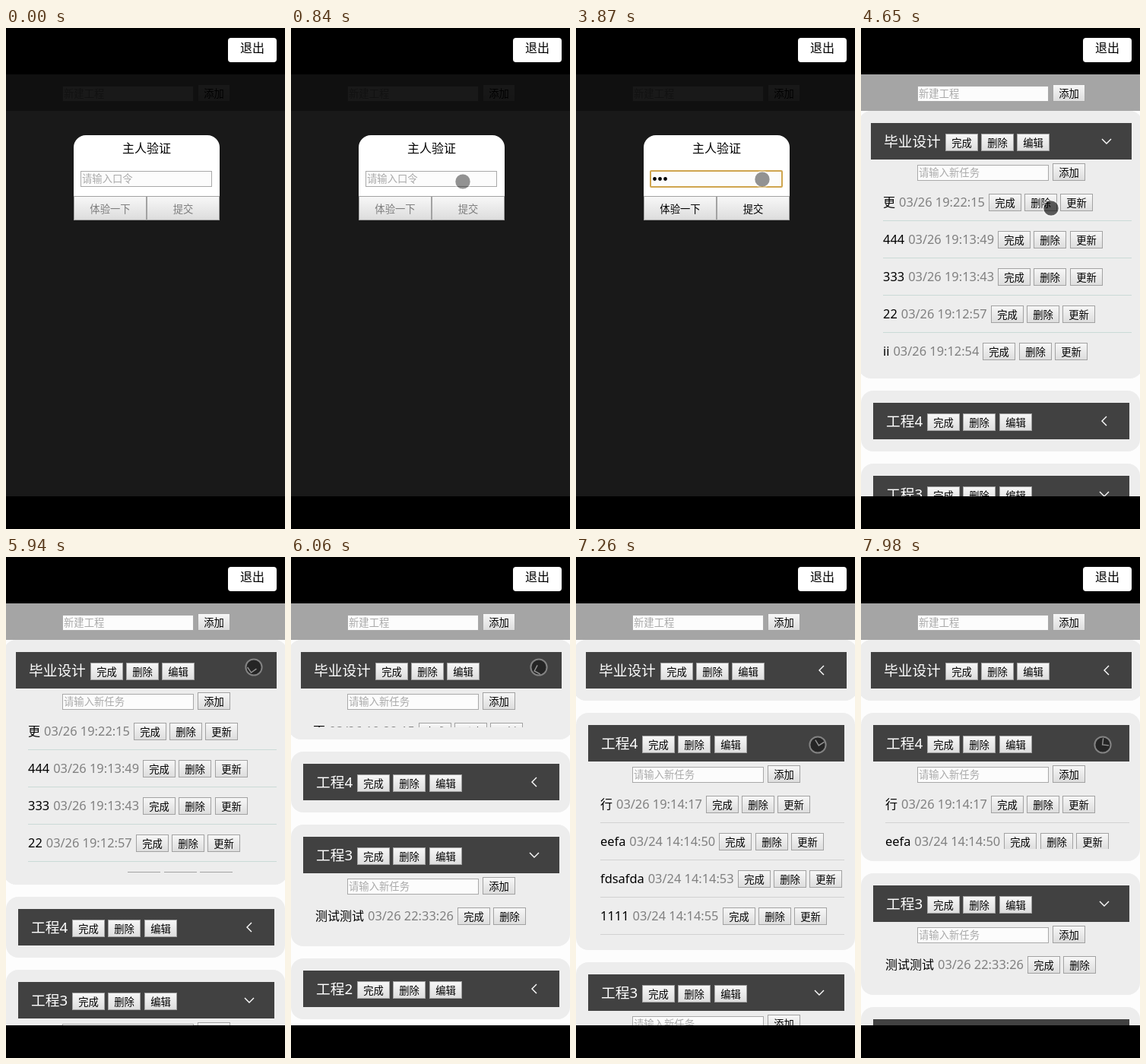
Write an HTML page with a canvas that moves like this. It is 367 px wide and 659 px high and loops after 8000 ms.

```html
<!DOCTYPE html>
<html lang="zh-CN">
<head>
<meta charset="utf-8">
<style>
html, body { margin: 0; width: 100%; height: 100%; overflow: hidden; background: #000; }
canvas { display: block; }
</style>
</head>
<body>
<canvas id="stage" width="367" height="659"></canvas>
<script>
const ctx = document.getElementById('stage').getContext('2d');
const LOOP = 8000, STEP = 30;
const FAMILY = '"Noto Sans", "Noto Sans CJK SC", "Noto Sans CJK", sans-serif';
const SMALL = '13.33px ' + FAMILY;
const BODY = '16px ' + FAMILY;
const LATIN = '16.4px ' + FAMILY;
const TITLE = '500 18.72px ' + FAMILY;

const SHOW_PAGE = 4530, SHOW_CARDS = 4650;
const FOCUS = 1830, BLUR = 4230, BLINK = 480;
const KEYS = [2850, 3000, 3210];
const SLIDE = 300;

// toggles: times at which a card opens or closes
const CARDS = [
  { title: '毕业设计', open: true, toggles: [5907], grow: 3, line: '#cadad7', rows: [
    ['更', '03/26 19:22:15'], ['444', '03/26 19:13:49'], ['333', '03/26 19:13:43'],
    ['22', '03/26 19:12:57'], ['ii', '03/26 19:12:54']] },
  { title: '工程4', open: false, toggles: [7093, 7880], grow: 0, line: '#d2d2d2', rows: [
    ['行', '03/26 19:14:17'], ['eefa', '03/24 14:14:50'], ['fdsafda', '03/24 14:14:53'],
    ['1111', '03/24 14:14:55'], ['222', '03/24 14:14:57']] },
  { title: '工程3', open: true, toggles: [], grow: 0, line: '#d2d2d2', rows: [
    ['测试测试', '03/26 22:33:26', true]] },
  { title: '工程2', open: false, toggles: [], grow: 0, line: '#d2d2d2', rows: [] }
];

// time, x, y
const POINTER = [
  [360, 372, 97], [840, 226, 202], [1860, 226, 202], [2070, 205, 201], [3720, 245, 199],
  [3870, 245, 199], [4020, 250, 228], [4170, 250, 237], [5040, 250, 237],
  [5200, 322, 476], [5490, 346, 10], [5610, 326, 145], [6180, 326, 145],
  [6480, 336, 254], [6600, 312, 255], [6810, 312, 255], [6870, 318, 247], [LOOP, 318, 247]
];

const within = (t, a, b) => t >= a && t < b;

// cubic-bezier(.25, .1, .25, 1)
function ease(p) {
  if (p <= 0) return 0;
  if (p >= 1) return 1;
  const bezier = (u, a, b) => 3 * a * u * (1 - u) ** 2 + 3 * b * u * u * (1 - u) + u ** 3;
  let lo = 0, hi = 1;
  for (let i = 0; i < 24; i++) {
    const mid = (lo + hi) / 2;
    if (bezier(mid, .25, .25) < p) lo = mid; else hi = mid;
  }
  return bezier(lo, .1, 1);
}

function rect(x, y, w, h, color) {
  ctx.fillStyle = color;
  ctx.fillRect(x, y, w, h);
}

function rounded(x, y, w, h, radii, color) {
  ctx.fillStyle = color;
  ctx.beginPath();
  ctx.roundRect(x, y, w, h, radii);
  ctx.fill();
}

function disc(x, y, r, color) {
  ctx.fillStyle = color;
  ctx.beginPath();
  ctx.arc(x, y, r, 0, 2 * Math.PI);
  ctx.fill();
}

function frame(x, y, w, h, color) {
  ctx.strokeStyle = color;
  ctx.lineWidth = 1;
  ctx.strokeRect(x + .5, y + .5, w - 1, h - 1);
}

function text(str, x, y, font, color, align = 'left') {
  ctx.font = font;
  ctx.fillStyle = color;
  ctx.textAlign = align;
  ctx.fillText(str, x, y);
}

function widthOf(str, font) {
  ctx.font = font;
  return ctx.measureText(str).width;
}

function button(label, x, y, w = 43, h = 23, color = '#000') {
  const fill = ctx.createLinearGradient(0, y, 0, y + h);
  fill.addColorStop(0, '#f8f8f8');
  fill.addColorStop(1, '#dcdcdc');
  rect(x, y, w, h, fill);
  frame(x, y, w, h, '#a2a2a2');
  text(label, x + w / 2, y + Math.floor(h / 2) + 6, SMALL, color, 'center');
}

function buttons(labels, x, y) {
  labels.forEach((label, i) => button(label, Math.round(x + i * 47.2), y));
}

function input(x, y, hint) {
  rect(x, y, 173, 21, '#fcfcfc');
  frame(x, y, 173, 21, '#a9a9a9');
  if (hint) text(hint, x + 2, y + 15, SMALL, '#a9a9a9');
}

function chevron(x, y, openness) {
  ctx.save();
  ctx.translate(x, y);
  ctx.rotate((1 - openness) * Math.PI / 2);
  ctx.strokeStyle = '#fff';
  ctx.lineWidth = 1.4;
  ctx.beginPath();
  ctx.moveTo(-6, -3);
  ctx.lineTo(0, 3);
  ctx.lineTo(6, -3);
  ctx.stroke();
  ctx.restore();
}

function opennessAt(card, t) {
  let open = card.open, value = +open;
  for (const start of card.toggles) {
    if (t < start) break;
    const p = ease((t - start) / SLIDE);
    value = open ? 1 - p : p;
    open = !open;
  }
  return value;
}

function drawRow([name, time, brief], x, y) {
  const font = /[^ -~]/.test(name) ? BODY : LATIN;
  const timeX = x + widthOf(name, font) + 5;
  text(name, x, y + 6, font, '#000');
  text(time, timeX, y + 6, LATIN, '#808080');
  buttons(brief ? ['完成', '删除'] : ['完成', '删除', '更新'], timeX + 118, y - 11);
}

function drawCard(card, top, t) {
  const openness = opennessAt(card, t);
  const body = Math.round(openness * (32 + 48 * card.rows.length));
  const left = 16 - card.grow, right = 353 + card.grow, bar = top + 16;

  rounded(-card.grow, top, 367 + 2 * card.grow, 80 + body, 16, '#ededed');
  rect(left, bar, right - left, 48, '#414141');
  text(card.title, left + 17, bar + 31, TITLE, '#fff');
  buttons(['完成', '删除', '编辑'], left + 23 + widthOf(card.title, TITLE), bar + 14);
  chevron(right - 33, bar + 24, openness);

  if (body) {
    ctx.save();
    ctx.beginPath();
    ctx.rect(0, bar + 48, 367, body);
    ctx.clip();
    input(74, bar + 55, '请输入新任务');
    button('添加', 252, bar + 53);
    card.rows.forEach((row, i) => {
      const y = bar + 104 + i * 49;
      drawRow(row, left + 16, y);
      if (i < card.rows.length - 1) rect(left + 16, y + 24, right - left - 16, 1, card.line);
    });
    ctx.restore();
  }
  return top + 96 + body;
}

function drawPage(t) {
  ctx.save();
  ctx.beginPath();
  ctx.rect(0, 61, 367, 555);
  ctx.clip();
  rect(0, 61, 367, 555, '#fdfdfd');
  if (t >= SHOW_CARDS) CARDS.reduce((top, card) => drawCard(card, top, t), 109);
  rect(0, 61, 367, 48, '#a5a5a5');
  input(74, 76, '新建工程');
  button('添加', 252, 74);
  if (t < SHOW_PAGE) rect(0, 61, 367, 555, 'rgba(0,0,0,.9)');
  ctx.restore();
}

function caretVisible(t) {
  if (!within(t, FOCUS, BLUR)) return false;
  const reset = [FOCUS, ...KEYS].filter(k => k <= t).pop();
  return Math.floor((t - reset) / BLINK) % 2 === 0;
}

function drawDialog(t) {
  const typed = KEYS.filter(k => k <= t).length;
  const label = typed ? '#000' : '#7d7d7d';
  rounded(89, 141, 192, 112, [16, 16, 0, 0], '#fff');
  text('主人验证', 185, 164, BODY, '#000', 'center');
  input(98, 188, typed ? '' : '请输入口令');
  if (within(t, FOCUS, BLUR)) {
    ctx.strokeStyle = '#cfa54f';
    ctx.lineWidth = 2;
    ctx.beginPath();
    ctx.roundRect(98, 188, 173, 21, 1);
    ctx.stroke();
  }
  for (let i = 0; i < typed; i++) disc(103.5 + 7 * i, 198.5, 2.4, '#000');
  if (caretVisible(t)) rect(100 + 7 * typed, 191, 1, 15, '#000');
  button('体验一下', 89, 221, 96, 32, label);
  button('提交', 185, 221, 96, 32, label);
}

function drawPointer(t) {
  if (t < POINTER[0][0] || within(t, KEYS[0], 3720)) return;
  const i = POINTER.findIndex(p => p[0] > t);
  const [t0, x0, y0] = POINTER[i - 1], [t1, x1, y1] = POINTER[i];
  // the pointer rests until typing starts, then reappears elsewhere
  const p = t1 === 3720 ? 0 : (t - t0) / (t1 - t0);
  const x = x0 + (x1 - x0) * p, y = y0 + (y1 - y0) * p;
  const pressed = within(t, 1530, 1860) || within(t, 4200, 5040);
  disc(x, y, 9.8, pressed ? 'rgba(0,0,0,.62)' : 'rgba(0,0,0,.42)');
  ctx.strokeStyle = 'rgba(255,255,255,.35)';
  ctx.lineWidth = 2;
  ctx.beginPath();
  ctx.arc(x, y, 10.6, 0, 2 * Math.PI);
  ctx.stroke();
}

function draw(now) {
  // the picture advances in steps; the 1 ms absorbs clock rounding
  const t = Math.floor(((now + 1) % LOOP) / STEP) * STEP;
  rect(0, 0, 367, 659, '#000');
  drawPage(t);
  if (t < SHOW_PAGE) drawDialog(t);
  rounded(292, 13, 64, 32, 4, '#fff');
  text('退出', 324, 32, BODY, '#000', 'center');
  drawPointer(t);
}

const start = performance.now();
function tick() {
  draw(performance.now() - start);
  requestAnimationFrame(tick);
}
tick();
</script>
</body>
</html>
```
